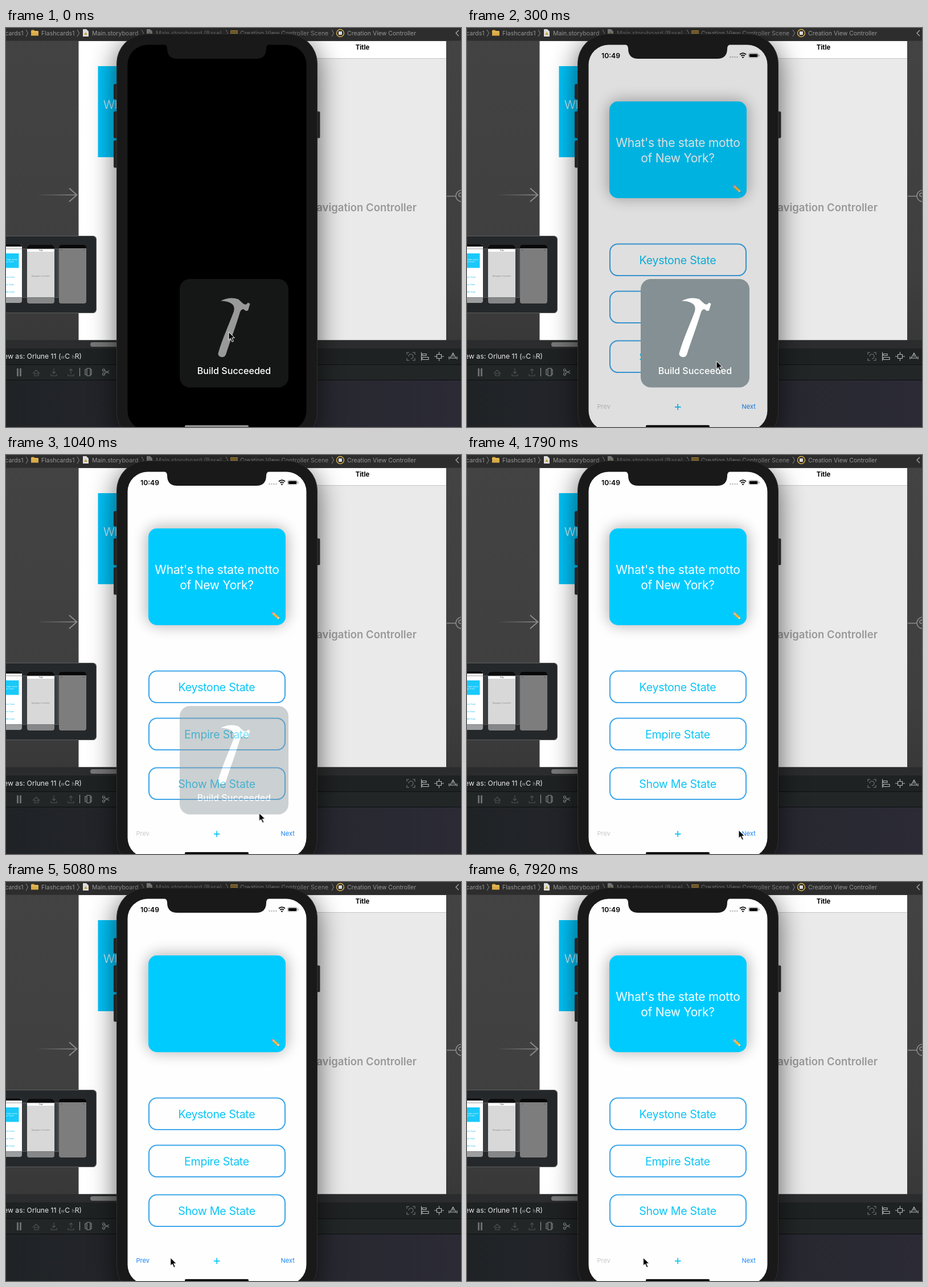
These frames come from a looping animation (799 by 701 pixels, 8 s). An HTML page:

```html
<!DOCTYPE html>
<html lang="en">
<head>
<meta charset="utf-8">
<title>Flashcards in the simulator</title>
<style>
  html, body { margin: 0; width: 100%; height: 100%; overflow: hidden; background: #222; }
  svg { display: block; width: 100%; height: 100%; font-family: Inter, "Open Sans", sans-serif; }
  .mid { text-anchor: middle; }
  .crumbs { font-size: 10.5px; fill: #979797; }
  .question { font-size: 21px; letter-spacing: -.27px; fill: #fff; text-anchor: middle; }
  .answer rect { fill: none; stroke: #40a7ea; stroke-width: 2.1; }
  .answer text { font-size: 19.6px; letter-spacing: -.3px; fill: #0cc5f7; text-anchor: middle; }
  .nav { font-size: 11px; fill: #1583f5; }
  .line { fill: none; stroke: #b5b7b8; stroke-width: 1.1; }
  .tools { stroke: #696c6e; }

  .anim { animation: 8s linear infinite; }
  .cut { animation: 8s step-end infinite; }
  #cursor { animation-name: cursor; }
  #app { animation-name: app; }
  #home { animation-name: home; }
  #toast { animation-name: toast; }
  #toastBox { animation-name: toastBox; }
  #hammer { animation-name: hammer; }
  #motto { animation-name: motto; }
  #who { animation-name: who; }
  #floor { animation-name: floor; }
  #next { animation-name: next; }
  #prev { animation-name: prev; }
  #prevTint { animation-name: prevTint; }

  @keyframes cursor {
    0%, 1% { transform: translate(391px, 534px); }
    1.88% { transform: translate(415px, 561px); }
    3.75% { transform: translate(438px, 585px); }
    5.63% { transform: translate(443px, 609px); }
    7.5% { transform: translate(444px, 623px); }
    13%, 15% { transform: translate(444.5px, 629px); }
    16.75% { transform: translate(441px, 630px); }
    18.63% { transform: translate(450px, 642px); }
    20.5% { transform: translate(469px, 656px); }
    24.25%, 60% { transform: translate(485px, 662px); }
    61.63% { transform: translate(418px, 657px); }
    63.5% { transform: translate(289px, 660px); }
    65.38% { transform: translate(260px, 663px); }
    67.25% { transform: translate(246px, 664px); }
    71%, 93.5% { transform: translate(240.5px, 662.5px); }
    95.25% { transform: translate(252px, 662px); }
    97.13% { transform: translate(285px, 661px); }
    99%, 100% { transform: translate(309.5px, 660px); }
  }
  @keyframes app {
    0%, 1.86% { opacity: 0; }
    1.88% { opacity: .5; }
    3.75% { opacity: .88; }
    5.63% { opacity: .98; }
    7.5%, 100% { opacity: 1; }
  }
  @keyframes home {
    0%, 1.86% { fill: #929292; }
    3.75%, 100% { fill: #000; }
  }
  @keyframes toast {
    0%, 10% { opacity: 1; }
    13% { opacity: .46; }
    14.8%, 100% { opacity: 0; }
  }
  @keyframes toastBox {
    0%, 1.86% { fill: #141716; }
    1.88% { fill: #4c5456; }
    3.75% { fill: #849093; }
    7%, 100% { fill: #909a9e; }
  }
  @keyframes hammer {
    0%, 1.86% { fill: #999; }
    3.75%, 100% { fill: #fff; }
  }
  @keyframes motto { 0% { opacity: 1; } 35.5% { opacity: 0; } 85.88% { opacity: 1; } }
  @keyframes who { 0% { opacity: 0; } 35.5% { opacity: 1; } 44.75% { opacity: 0; } 81.25% { opacity: 1; } 85.88%, 100% { opacity: 0; } }
  @keyframes floor { 0% { opacity: 0; } 44.75% { opacity: 1; } 54.13% { opacity: 0; } 76.5% { opacity: 1; } 81.25%, 100% { opacity: 0; } }
  @keyframes next {
    0%, 33.6% { opacity: 1; }
    33.62%, 35.5% { opacity: .2; }
    41%, 42.8% { opacity: 1; }
    42.88%, 44.75% { opacity: .2; }
    50.3%, 52.2% { opacity: 1; }
    52.25%, 54.13% { opacity: .2; }
    61%, 100% { opacity: 1; }
  }
  @keyframes prev {
    0%, 74.7% { opacity: 1; }
    74.75%, 76.5% { opacity: .2; }
    78.2% { opacity: .45; }
    78.3%, 81.25% { opacity: .2; }
    83% { opacity: .5; }
    83.1%, 85.86% { opacity: .2; }
    87.7%, 100% { opacity: 1; }
  }
  @keyframes prevTint { 0% { fill: #c9c9c9; } 35.5% { fill: #1583f5; } 85.88%, 100% { fill: #c9c9c9; } }
</style>
</head>
<body>
<svg viewBox="0 0 799 701" preserveAspectRatio="none">
  <defs>
    <linearGradient id="canvas" x2="0" y2="1">
      <stop offset="0" stop-color="#434343"/><stop offset=".6" stop-color="#3f3f3f"/><stop offset="1" stop-color="#303030"/>
    </linearGradient>
    <linearGradient id="console"><stop offset="0" stop-color="#202326"/><stop offset="1" stop-color="#2b2a35"/></linearGradient>
    <linearGradient id="fadeIn"><stop offset="0" stop-color="#888" stop-opacity=".1"/><stop offset="1" stop-color="#909090"/></linearGradient>
    <filter id="phoneShadow" x="-50%" y="-30%" width="200%" height="160%"><feGaussianBlur stdDeviation="24"/></filter>
    <filter id="cardShadow" x="-30%" y="-30%" width="160%" height="160%"><feGaussianBlur stdDeviation="12"/></filter>
    <g id="folder"><path d="M0 2q0-1.500 1.500-1.500h3.500l1.500 1.500h5q1.500 0 1.500 1.500v7h-13z" fill="#d9aa45"/><path d="M0 4h13" stroke="#f0ca70"/></g>
    <g id="page"><path d="M0 0h6l4 4v9h-10z" fill="#dcdcdc"/><path d="M2 10l3-5 3 5z" fill="#c9a23a"/></g>
    <path id="chevron" d="M0 0l3.500 6-3.500 6" fill="none" stroke="#8b8b8b"/>
  </defs>

  <!-- Storyboard canvas -->
  <rect width="799" height="701" fill="url(#canvas)"/>
  <rect x="127.500" y="23" width="330" height="525.500" fill="#fff"/>
  <rect x="161.500" y="67" width="200" height="160" fill="#00c3f8"/>
  <text x="171" y="142" font-size="20.500" font-weight="300" fill="#e4f8ff">What's</text>
  <rect x="457" y="23" width="316" height="525.500" fill="#eaeaea"/>
  <rect x="457" y="23" width="316" height="30" fill="#fff"/>
  <path d="M457 53.500h316" stroke="#c6c6c6"/>
  <text class="mid" x="626" y="38" font-size="11.300" font-weight="700">Title</text>
  <text x="721" y="321.500" font-size="18.500" font-weight="600" fill="#999" text-anchor="end">Navigation Controller</text>
  <rect x="58" y="292.500" width="66" height="1.600" fill="url(#fadeIn)"/>
  <path d="M111 281.500l13.500 11.700-13.500 11.800" fill="none" stroke="#8d8d8d" stroke-width="1.800"/>
  <g fill="none" stroke="#8d8d8d" stroke-width="1.500">
    <path d="M774 295.500h16"/><circle cx="800" cy="295" r="10"/><circle cx="798" cy="293" r="3"/>
  </g>

  <!-- Path bar -->
  <rect width="799" height="22.500" fill="#2d2d2d"/>
  <g class="crumbs">
    <text x="30.500" y="12.500" text-anchor="end">Flashcards1</text>
    <text x="62" y="12.500">Flashcards1</text>
    <text x="151" y="12.500">Main.storyboard</text>
    <text x="263" y="12.500" fill="#777">Main.storyboard (Base)</text>
    <text x="411" y="12.500" fill="#888">Creation View Controller Scene</text>
    <text x="599" y="12.500">Creation View Controller</text>
  </g>
  <use href="#chevron" x="35" y="3"/><use href="#chevron" x="125" y="3"/><use href="#chevron" x="238" y="3"/>
  <use href="#chevron" x="386" y="3"/><use href="#chevron" x="572" y="3"/>
  <path d="M795 4l-5 5 5 5" fill="none" stroke="#aaa" stroke-width="1.300"/>
  <use href="#folder" x="44" y="3"/>
  <use href="#page" x="135" y="2"/><use href="#page" x="247" y="2" opacity=".5"/>
  <rect x="394" y="4" width="13" height="9" rx="1" fill="#a5833a"/><path d="M395 7h11" stroke="#3a3222"/>
  <circle cx="587" cy="9" r="6.500" fill="none" stroke="#d9b14a" stroke-width="1.400"/><rect x="584" y="6" width="6" height="6" fill="#d8d8d8"/>

  <!-- Lower bars -->
  <rect y="548.500" width="799" height="15" fill="#2a2c2d"/>
  <rect x="148" y="552" width="130" height="8" rx="4" fill="#777"/>
  <rect y="563" width="799" height="28" fill="#1f2223"/>
  <rect y="591" width="799" height="27" fill="#222627"/>
  <path d="M0 591.500h799M0 618.500h799" stroke="#0d0e0f"/>
  <rect y="619" width="799" height="82" fill="url(#console)"/>
  <text x="133" y="581" font-size="12.200" fill="#e9e9e9" text-anchor="end">View as: Orlune 11 (<tspan font-size="8.500" fill="#999">w</tspan>C <tspan font-size="8.500" fill="#999">h</tspan>R)</text>
  <g class="line">
    <path d="M704 574v-4h4M714 570h4v4M718 580v4h-4M708 584h-4v-4M707 577a4 4 0 1 1 4 4" opacity=".6"/>
    <path d="M729.500 569.500v15M731 572.500h7v3h-7zM731 578.500h11v4h-11z"/>
    <path d="M756.500 573.500h8v7h-8zM760.500 569v4M760.500 581v4M752 577h4M765 577h4"/>
    <path d="M785 571l5 9h-10zM778 577v5M792 577v5M785 574v4"/>
  </g>
  <g class="line tools">
    <path d="M20.500 598v14M25.500 598v14" stroke-width="3"/>
    <path d="M47 607l6-6 6 6M50 607h7v4h-7zM84 598v9M81 604l3 3 3-3M79 608v3h10v-3M114 608v-9M111 602l3-3 3 3M109 608v3h10v-3" opacity=".65"/>
    <path d="M129.500 597v15" stroke="#999"/>
    <path d="M141 600h-2v9h2M148 600h2v9h-2M142 598h6v13h-6z" stroke="#8c8f91"/>
    <g stroke="#8c8f91"><circle cx="171.500" cy="601" r="2"/><circle cx="171.500" cy="608" r="2"/><path d="M173 602l8 5M173 607l8-5"/></g>
  </g>

  <!-- Minimap -->
  <rect x="-9" y="365.500" width="167.500" height="135" rx="6" fill="#25282a" stroke="#5c5e5f" stroke-width="1.100"/>
  <rect x="-20" y="380" width="48" height="103" rx="4" fill="#fff"/>
  <path d="M-5 380h29q4 0 4 4h-34z" fill="#111"/>
  <rect x="-15" y="396" width="37.500" height="25.500" fill="#00c3f8"/>
  <g font-size="3.600" fill="#dff7ff" text-anchor="end">
    <text x="20" y="408">What's the state motto</text><text x="14" y="412">of New York?</text>
    <g fill="#18b8e8"><text x="15" y="439">Keystone State</text><text x="14" y="452">Empire State</text><text x="15" y="465">Show Me State</text></g>
  </g>
  <rect x="37" y="381" width="48" height="103" rx="4" fill="#d4d4d4"/>
  <path d="M37 388v-3q0-4 4-4h40q4 0 4 4v3z" fill="#0d0d0d"/><path d="M37 388h48v5h-48z" fill="#fff"/>
  <text class="mid" x="61" y="392" font-size="3.300">Title</text>
  <text class="mid" x="61" y="437" font-size="3.200" fill="#777">Navigation Controller</text>
  <rect x="93" y="381" width="48" height="103" rx="4" fill="#7d7d7d"/>
  <path d="M93 387v-2q0-4 4-4h40q4 0 4 4v2z" fill="#080808"/>
  <path d="M96 390h3M135 390h3" stroke="#555"/>
  <rect x="-9" y="388" width="101" height="85.500" fill="#fff" fill-opacity=".1" stroke="#777" stroke-opacity=".7"/>
  <rect x="-8" y="473.500" width="94" height="11" fill="#25282a" opacity=".45"/>

  <!-- Phone -->
  <rect x="194" y="20" width="353" height="720" rx="52" opacity=".62" filter="url(#phoneShadow)"/>
  <g fill="#242424" stroke="#111" stroke-width=".7">
    <rect x="189.500" y="99" width="7" height="26" rx="1.500"/><rect x="189.500" y="147" width="7" height="46" rx="1.500"/>
    <rect x="189.500" y="198" width="7" height="47" rx="1.500"/><rect x="544" y="147" width="7" height="46" rx="1.500"/>
  </g>
  <rect x="194.500" y="10.500" width="352" height="717" rx="52" fill="#191919" stroke="#303030"/>
  <rect x="213.500" y="29.500" width="314" height="678" rx="35"/>

  <g id="app" class="anim">
    <rect x="213.500" y="29.500" width="314" height="678" rx="35" fill="#fefefe"/>
    <text x="236" y="52.500" font-size="12.200" font-weight="600">10:49</text>
    <g fill="#bbb"><circle cx="462.500" cy="51" r="1.300"/><circle cx="466.500" cy="51" r="1.300"/><circle cx="470.500" cy="51" r="1.300"/><circle cx="474.500" cy="51" r="1.300"/></g>
    <g fill="none" stroke="#000" stroke-width="1.800"><path d="M479 46.500q5.500-4.800 11 0M481.200 49q3.300-2.700 6.600 0"/><path d="M483 51l1.500 2 1.500-2z" stroke-width="1"/></g>
    <rect x="494.500" y="44.500" width="17" height="7.500" rx="2.300" fill="none" stroke="#999" stroke-width=".8"/>
    <rect x="495.800" y="45.700" width="14.500" height="5.200" rx="1.300"/><path d="M513 46.700v3.200" stroke="#999" stroke-width="1.200"/>

    <rect x="246" y="125" width="249" height="176" rx="24" opacity=".27" filter="url(#cardShadow)"/>
    <rect x="250" y="129" width="241" height="170" rx="15" fill="#00cbff"/>
    <g class="question">
      <g id="motto" class="cut"><text x="370.500" y="209">What's the state motto</text><text x="370" y="236">of New York?</text></g>
      <text id="who" class="cut" x="370" y="222">Who am I?</text>
      <g id="floor" class="cut"><text x="370.500" y="209">What floor is our</text><text x="370" y="236">apartment on?</text></g>
    </g>
    <g transform="translate(467.500 276.500) rotate(43)">
      <rect y="-2" width="3" height="4" rx="1" fill="#e8848c"/><rect x="2.500" y="-2" width="2" height="4" fill="#c9ced0"/>
      <rect x="4.500" y="-2.200" width="9" height="4.400" fill="#f4a325"/><path d="M4.500 0h9" stroke="#ffce55" stroke-width="1.300"/>
      <path d="M13.500-2.200l5 2.200-5 2.200z" fill="#f2d6a8"/><path d="M17-.7l1.700.7-1.700.7z" fill="#333"/>
    </g>
    <g class="answer">
      <rect x="251" y="379.500" width="239" height="55.500" rx="14"/><text x="370" y="414.700">Keystone State</text>
      <rect x="251" y="462.500" width="239" height="55.500" rx="14"/><text x="370" y="498">Empire State</text>
      <rect x="251" y="549.500" width="239" height="55.500" rx="14"/><text x="370" y="585">Show Me State</text>
    </g>
    <g id="prev" class="anim"><text id="prevTint" class="nav cut" x="228.500" y="668.500">Prev</text></g>
    <path d="M365 665.800h10.500M370.200 660.500v10.500" stroke="#0cc3f6" stroke-width="1.700"/>
    <text id="next" class="nav anim" x="482.500" y="668.500">Next</text>
  </g>
  <rect id="home" class="anim" x="314" y="697.800" width="112" height="4" rx="2"/>
  <path d="M275 28q8 1 8 8 0 18 18 18h138q18 0 18-18 0-7 8-8z" fill="#191919"/>

  <!-- Build notice -->
  <g id="toast" class="anim">
    <rect id="toastBox" class="anim" x="305" y="441" width="191" height="190.500" rx="18"/>
    <path id="hammer" class="anim" d="M377 479.500Q393 471.500 408 476.500L414 482Q418 486.500 422 485.500L425 482.500 428.500 484.500 425 496.500 421 497 417 494Q413 494 411 499C404 523 394 549 386 574Q383 580 376 577.500 371 575 373 570C380 546 391 522 400 498Q403 488 395 483.500 388 479.500 377 479.500z"/>
    <text class="mid" x="400.500" y="608.300" font-size="16.100" font-weight="500" fill="#fff">Build Succeeded</text>
  </g>

  <path id="cursor" class="anim" d="M0 0v14.300l3.300-3.100 2.700 6.100 2.500-1.100-2.700-5.900h4.600z" fill="#000" stroke="#fff" stroke-width="1"/>
</svg>
</body>
</html>
```
